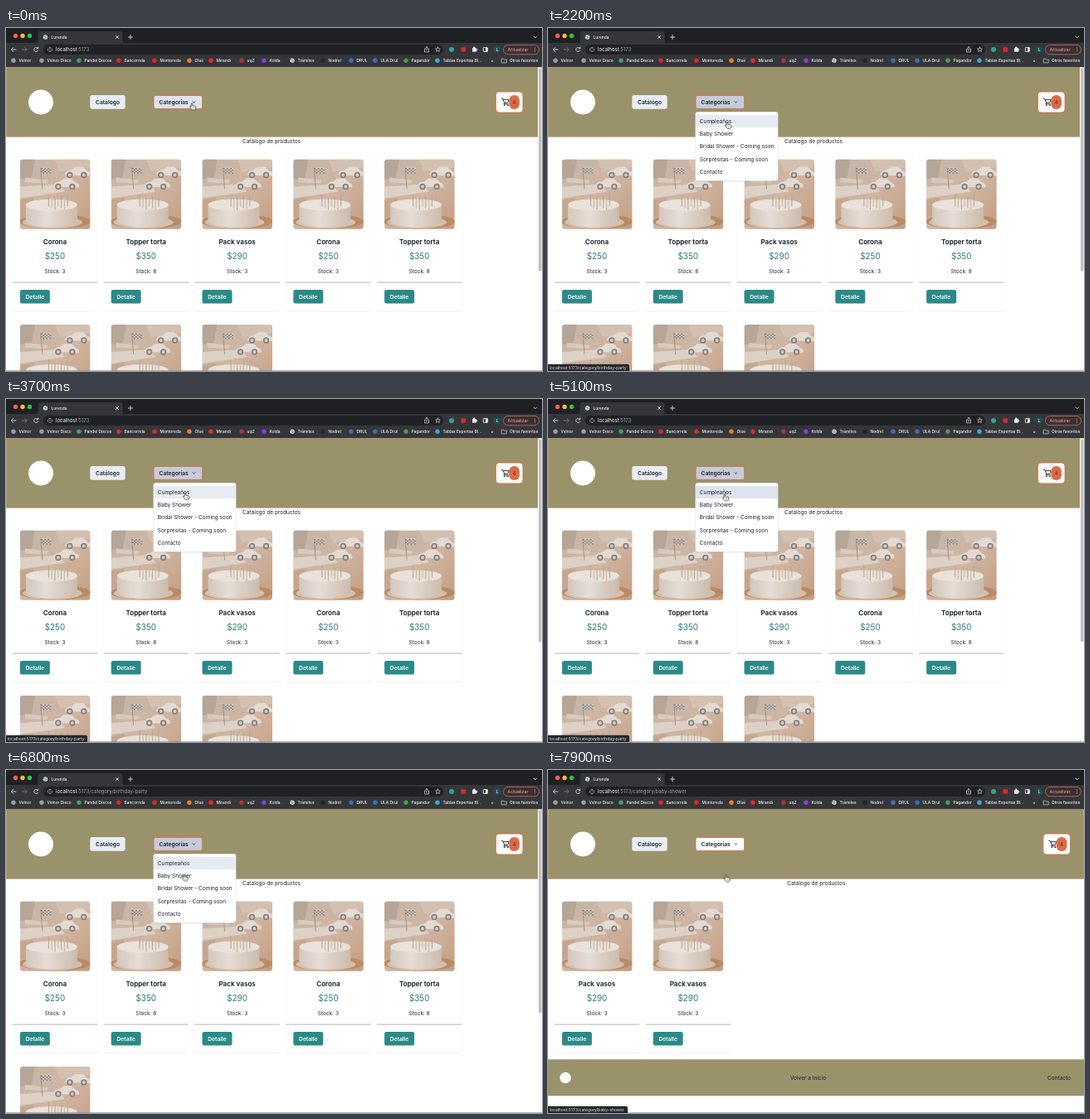
Recreate the animation shown at these times as an HTML page. Size 646 px wide and 414 px high, loop 8 s.

```html
<!DOCTYPE html>
<html lang="es">
<head>
<meta charset="utf-8">
<title>Lurenda</title>
<style>
  html, body { margin: 0; width: 100%; height: 100%; overflow: hidden; background: #fff; }
  svg { display: block; width: 100vw; height: 100vh; }
  text { font-family: Inter, Roboto, sans-serif; white-space: pre; }
  .mid { text-anchor: middle; }
  .body { font-size: 6.5px; fill: #1a202c; }
  .btn { font-size: 6.7px; font-weight: 600; fill: #1a202c; }
  .title { font-size: 8.1px; font-weight: 600; fill: #111722; }
  .price { font-size: 9.9px; fill: #2c7a7b; }
  .mark { font-size: 4.85px; font-weight: 500; fill: #f0f1f3; }
  .url { font-size: 6px; fill: #9aa0a6; }
  .tip { font-size: 5.05px; fill: #e4e5e8; }
  .line { fill: none; stroke: #d5d7da; stroke-width: .9; stroke-linecap: round; stroke-linejoin: round; }

  .anim { animation: 8s step-end infinite; }
  .all { animation-name: all; }
  .party { animation-name: party; }
  .shower { animation-name: shower; }
  .long { animation-name: long; }
  .cart { animation-name: cart; }
  .drop { animation-name: drop; }
  .first { animation-name: first; }
  .second { animation-name: second; }
  .tip1 { animation-name: tip1; }
  .tip2 { animation-name: tip2; }
  .hand { animation-name: hand; }
  .arrow { animation-name: arrow; }
  .menu { animation: menu 8s ease-out infinite; transform-origin: 178px 101px; }
  .cursor { animation: cursor 8s ease-in-out infinite; }

  /* clicks: 65% opens the first category, 96.25% the second */
  @keyframes all { 0% { opacity: 1 } 65%, 100% { opacity: 0 } }
  @keyframes party { 0% { opacity: 0 } 65% { opacity: 1 } 96.25%, 100% { opacity: 0 } }
  @keyframes shower { 0% { opacity: 0 } 96.25%, 100% { opacity: 1 } }
  @keyframes long { 0% { opacity: 1 } 96.25%, 100% { opacity: 0 } }
  @keyframes cart { 0% { transform: none } 96.25%, 100% { transform: translateX(6.5px) } }
  @keyframes drop {
    0% { fill: #dde3ec } 2.5% { fill: #c4ccda } 65% { fill: #fff }
    76.25% { fill: #dde3ec } 78.75% { fill: #c4ccda } 96.25%, 100% { fill: #fff }
  }
  @keyframes first {
    0% { opacity: 1; fill: #e7ecf3 } 62.5% { opacity: 1; fill: #dee4ed }
    65% { opacity: 1; fill: #e7ecf3 } 86.25%, 100% { opacity: 0; fill: #e7ecf3 }
  }
  @keyframes second {
    0% { opacity: 0; fill: #e7ecf3 } 86.25% { opacity: 1; fill: #e7ecf3 }
    95%, 100% { opacity: 1; fill: #dee4ed }
  }
  @keyframes tip1 { 0% { opacity: 0 } 21.25% { opacity: .6 } 22.5% { opacity: 1 } 68.75%, 100% { opacity: 0 } }
  @keyframes tip2 { 0% { opacity: 0 } 90% { opacity: .6 } 91.25%, 100% { opacity: 1 } }
  @keyframes hand { 0% { opacity: 1 } 13% { opacity: 0 } 16.25%, 100% { opacity: 1 } }
  @keyframes arrow { 0% { opacity: 0 } 13% { opacity: 1 } 16.25%, 100% { opacity: 0 } }
  @keyframes menu {
    0%, 2.5% { opacity: 0; transform: scale(.8) }
    5%, 65% { opacity: 1; transform: none }
    66.25%, 78.75% { opacity: 0; transform: scale(.8) }
    81.25%, 96.25% { opacity: 1; transform: none }
    97.5%, 100% { opacity: 0; transform: scale(.8) }
  }
  @keyframes cursor {
    0%, 10% { transform: translate(224px, 90.5px) }
    14.5% { transform: translate(216px, 112.5px) }
    18.75%, 55% { transform: translate(216px, 113px) }
    58.75%, 70% { transform: translate(213px, 114.5px) }
    75% { transform: translate(217px, 97.5px) }
    77.5%, 80% { transform: translate(219px, 91px) }
    85% { transform: translate(214.5px, 125.5px) }
    87.5%, 100% { transform: translate(214.5px, 126.5px) }
  }
</style>
</head>
<body>
<svg id="stage" viewBox="0 0 646 414" preserveAspectRatio="none"></svg>
<script>
const rect = (x, y, w, h, fill, r = 0, more = '') =>
  `<rect x="${x}" y="${y}" width="${w}" height="${h}" rx="${r}" fill="${fill}" ${more}/>`;
const dot = (x, y, r, fill, more = '') => `<circle cx="${x}" cy="${y}" r="${r}" fill="${fill}" ${more}/>`;
const text = (x, y, cls, str) => `<text x="${x}" y="${y}" class="${cls}">${str}</text>`;
const line = (d, more = '') => `<path class="line" d="${d}" ${more}/>`;
const group = (cls, body) => `<g class="${cls}">${body}</g>`;
const globe = (x, y) => dot(x, y, 2.7, '#e4e5e8') +
  line(`M${x - 2} ${y - 1}l2 .6 1-1.4M${x - 1} ${y + 2}l.8-1.2 1.8-.2`, 'style="stroke:#55575c;stroke-width:.7"');

const OLIVE = '#9a926b', TOMATO = '#dc6a45', TEAL = '#2b8a88', EDGE = '#c98d66';

const defs = () => {
  const wheel = (x, y) => dot(x, y, 2.8, '#d5cdc7', 'stroke="#85817f" stroke-width="1.8"');
  const car = (x, y) => `<path d="M${x - 14} ${y}q1-6 8-6l5-4h9l5 5q5 1 4 6z" fill="#e3dad2"/>` +
    wheel(x - 8, y) + wheel(x + 9, y);
  let candles = '', checks = '';
  for (let i = 0; i < 7; i++) {
    candles += rect(34 + i * 3.8, 42 + i % 3 * 2, 1.1, 15, i % 2 ? '#d8b880' : '#a9abad', .5);
  }
  for (let i = 0; i < 12; i++) {
    checks += rect(25 + i % 6 * 2.1, 10.5 + (i / 6 | 0) * 3.4 + i % 2 * 1.7, 2.1, 1.7, '#8a8580');
  }
  return `<defs>
    <linearGradient id="wall" x2="1" y2="1">
      <stop stop-color="#c3b6a8"/><stop offset=".5" stop-color="#d0b5a1"/><stop offset="1" stop-color="#c39d81"/>
    </linearGradient>
    <linearGradient id="cream" x2="1"><stop stop-color="#d3c7bd"/><stop offset=".4" stop-color="#e6ddd6"/><stop offset="1" stop-color="#cbbbad"/></linearGradient>
    <clipPath id="round"><rect width="84.5" height="84.3" rx="3.6"/></clipPath>
    <filter id="soft" x="-10%" y="-10%" width="120%" height="125%">
      <feDropShadow dx="0" dy=".7" stdDeviation=".7" flood-opacity=".13"/>
    </filter>
    <g id="photo" clip-path="url(#round)">
      ${rect(0, 0, 85, 85, 'url(#wall)')}
      <path d="M0 0h18l-4 22-14 2z" fill="#b5a698"/>
      <path d="M42 0h42v10l-36 5z" fill="#d3c0b0"/>
      <path d="M0 33l46-3 8 9-54 8z" fill="#ddd1c6"/>
      <path d="M6 22l28 3-2 4-26-1z" fill="#d8cabd"/>
      ${car(68, 19)}${car(54, 33)}
      ${rect(25, 10, 12.6, 7.4, '#d3cbc4')}${checks}
      <path d="M25 10l2 26" stroke="#94877d" stroke-width=".8"/>
      <path d="M0 49l16-3v20l-16 5z" fill="#c5a68e"/>
      <ellipse cx="42" cy="75" rx="43" ry="9" fill="#b98b65"/>
      <ellipse cx="39" cy="76" rx="36" ry="7.500" fill="#d5bfab"/>
      <path d="M7 56v19q6 7 31 7t31-7V56z" fill="url(#cream)"/>
      <ellipse cx="38" cy="55" rx="31" ry="7" fill="#e9e1da"/>
      ${candles}
    </g>
  </defs>`;
};

const marks = [
  [9, '#9b9da1', 'Velnor'], [43, '#9b9da1', 'Velnor Disco'], [88, '#3fa45b', 'Pandel Discos'],
  [136, '#e0262d', 'Bancorrela'], [179, '#dd2a24', 'Montoreda'], [221, '#e8812e', 'Olué'],
  [247, '#f02a22', 'Mirandi'], [284, '#a8392f', 'uqZ'], [311, '#8e3ddb', 'Kolda'],
  [345, '', 'Trámites'], [382, '#24262a', 'Nodrel'], [416, '#3b6fb5', 'DRUL'],
  [445, '#3b6fb5', 'ULA Drul'], [482, '#4f9a4b', 'Pagandor'], [520, '#3fa9d8', 'Tablas Expertas Bl...']
];

const browser = () => {
  const thin = 'style="stroke-width:.7"';
  const url = (cls, path) => group('anim ' + cls,
    `<text x="60" y="28.2" class="url"><tspan fill="#f1f3f4">localhost</tspan>:5173${path}</text>`);
  return rect(0, 0, 646, 19, '#1f2024') + rect(0, 18, 646, 29.2, '#35363a') +
    '<path d="M36 18.5q2.5 0 2.5-3V7q0-3 3-3h96q3 0 3 3v8.5q0 3 2.5 3z" fill="#35363a"/>' +
    ['#fe5f57', '#febc2e', '#28c840'].map((c, i) => dot(11.5 + i * 8.5, 9.5, 2.7, c)).join('') +
    globe(47.5, 11) + text(54.5, 12.9, 'mark', 'Lurenda') +
    line('M132.5 9.5l3 3m0-3l-3 3M147.5 11h5m-2.5-2.5v5M636 10l1.8 1.8 1.8-1.8') +
    line('M12 26h-5.5m2.3-2.5L6.3 26l2.5 2.5') +
    line('M19.5 26h5.5m-2.3-2.5l2.5 2.5-2.5 2.5', 'style="stroke:#77797d"') +
    line('M38.5 24.5a2.6 2.6 0 1 0 .2 2.5M38.8 23v1.8h-1.8') +
    rect(45, 20, 482, 12, '#202124', 6) +
    line('M53 23.4a2.6 2.6 0 1 0 .01 0M53 25.8v1.5M53 24.6v.1', 'style="stroke:#a5a8ac;stroke-width:.7"') +
    url('all', '') + url('party', '/category/birthday-party') + url('shower', '/category/baby-shower') +
    line('M505.5 25h-1v4h5v-4h-1M507 27v-4.5m-1.2 1.2l1.2-1.2 1.2 1.2', thin) +
    line('M520.5 23l.9 1.9 2 .2-1.5 1.4.4 2-1.8-1-1.8 1 .4-2-1.5-1.4 2-.2z', thin) +
    dot(537, 26, 3, '#2fa58d') + rect(548.5, 23.2, 5.5, 5.5, '#d92b26', 1) +
    rect(562, 24, 4.8, 4.8, '#e8eaed', .6) + dot(564.2, 23.7, 1.2, '#e8eaed') + dot(566.9, 26.3, 1.2, '#e8eaed') +
    rect(575.3, 23.5, 5, 5, 'none', .6, 'stroke="#e8eaed" stroke-width=".9"') + rect(578, 23.5, 2.4, 5, '#e8eaed') +
    dot(592, 26, 4, '#14545c') + text(592, 27.7, 'mark mid', 'L') +
    rect(599.5, 20.5, 43, 11.3, '#3b3032', 5.6, 'stroke="#d9776f" stroke-width=".7"') +
    '<text x="604.5" y="28" style="font-size:5.3px" fill="#f0a39c">Actualizar</text>' +
    [24, 26, 28].map(y => dot(637.5, y, .6, '#f0a39c')).join('') +
    marks.map(([x, c, name]) =>
      (c ? dot(x, 39.3, 2.7, c) : globe(x, 39.3)) + text(x + 6.5, 41.1, 'mark', name)).join('') +
    text(584.5, 41, 'mark', '»') + line('M597.5 37.2h2l.7.9h3v3.8h-5.7z', thin) +
    text(607, 41.1, 'mark', 'Otros favoritos');
};

const products = [['Corona', 250, 3], ['Topper torta', 350, 8], ['Pack vasos', 290, 3]];

const card = (i, kind) => {
  const [name, price, stock] = products[kind];
  return `<g transform="translate(${8 + i % 5 * 109.8} ${150 + (i / 5 | 0) * 199.5})">` +
    rect(0, 0, 102.2, 191.3, '#fff', 2.7, 'filter="url(#soft)"') +
    '<use href="#photo" x="8.9" y="8.5"/>' +
    text(51, 111, 'title mid', name) + text(51, 129.3, 'price mid', '$' + price) +
    text(51, 146, 'body mid', 'Stock: ' + stock) +
    rect(0, 156.7, 102.2, .7, '#8f9296') + rect(8.9, 166, 36, 16.5, TEAL, 2.5) +
    '<text x="26.9" y="176.5" class="btn mid" style="fill:#fff">Detalle</text></g>';
};

const list = (cls, x, kinds, extra = '') => group('anim ' + cls,
  text(x, 139, 'body mid', 'Catálogo de productos') + kinds.map((k, i) => card(i, k)).join('') + extra);

const footer = rect(0, 349.3, 646, 44, OLIVE) + dot(21, 371.5, 6.8, '#fff') +
  text(313.5, 373.9, 'body mid', 'Volver a Inicio') + text(616, 373.9, 'body mid', 'Contacto');

const header = rect(.25, 47.3, 645.5, 84, OLIVE, 0, `stroke="${EDGE}" stroke-width=".5"`) +
  dot(42, 89.5, 15, '#fff') +
  rect(101.3, 81, 42.4, 16.7, '#e9eef4', 2.7) + text(122.5, 91.6, 'btn mid', 'Catálogo') +
  rect(178, 81.4, 58.7, 16, '#fff', 2.5, `class="anim drop" stroke="${TOMATO}" stroke-width=".9"`) +
  text(184.5, 91.6, 'btn', 'Categorías') +
  line('M224.9 88.7l1.5 1.5 1.5-1.5', 'style="stroke:#1a202c;stroke-width:.8"') +
  group('anim cart', rect(590.3, 77, 32.7, 25, '#fff', 4, `stroke="${TOMATO}" stroke-width=".9"`) +
    line('M597.2 85.3h1.5l2 5h4l1.5-3.7h-6.8M600.8 90.3l-.8 1.7h5.5', 'style="stroke:#222"') +
    dot(600.6, 93.4, .8, '#222') + dot(604.9, 93.4, .8, '#222') +
    rect(606.3, 81, 12.6, 17, TOMATO, 6) +
    '<text x="612.6" y="91.5" class="mid" style="font-size:5.6px" fill="#3a2a26">4</text>');

const scrollbar = group('anim long', rect(641, 47.2, 5, 367, '#fbfbfb') + rect(640.5, 47.2, .5, 84, EDGE) +
  rect(642, 48.5, 3.4, 245, '#bfbfc1', 1.7));

const items = ['Cumpleaños', 'Baby Shower', 'Bridal Shower - Coming soon', 'Sorpresitas - Coming soon', 'Contacto'];
const menu = group('menu',
  rect(177.8, 101.3, 99.3, 83, '#fff', 2.7, 'filter="url(#soft)" stroke="#dfe4ea" stroke-width=".5"') +
  rect(178, 105, 99, 15.2, '#e7ecf3', 0, 'class="anim first"') +
  rect(178, 120.2, 99, 15.2, '#e7ecf3', 0, 'class="anim second"') +
  items.map((name, i) => text(182.8, 115.1 + i * 15.15, 'body', name)).join(''));

const tip = (cls, w, path) => group('anim ' + cls,
  `<path d="M0 405.7h${w - 2}q2 0 2 2v6.3H0z" fill="#26272b"/>` +
  text(1.8, 411.8, 'tip', 'localhost:5173/category/' + path));

const cursor = group('cursor',
  group('anim hand', `<path d="M-.8.7q.8-1 1.6 0v2.5l3.2.7q1 .3.9 1.3l-.5 2.4q-.2.7-1 .7H.5q-.6 0-1-.6L-2.4 4.9q-.2-1 .8-.8l.8.6z"
    fill="#fff" stroke="#222" stroke-width=".7" stroke-linejoin="round"/>
    <path d="M1 5.2v1.6M2.500 5.2v1.6" stroke="#333" stroke-width=".4"/>`) +
  group('anim arrow', '<path d="M0 0v7l1.6-1.5 1.1 2.5 1.2-.5-1.1-2.4h2.2z" fill="#111" stroke="#fff" stroke-width=".5"/>'));

document.getElementById('stage').innerHTML = defs() + rect(0, 0, 646, 414, '#fff') +
  list('all', 320, [0, 1, 2, 0, 1, 0, 1, 2]) +
  list('party', 320, [0, 1, 2, 0, 1, 0]) +
  list('shower', 323.3, [2, 2], footer) +
  header + scrollbar + browser() + menu +
  rect(0, 413.4, 646, .6, '#8a8a8c') +
  tip('tip1', 98, 'birthday-party') + tip('tip2', 96, 'baby-shower') + cursor;
</script>
</body>
</html>
```
